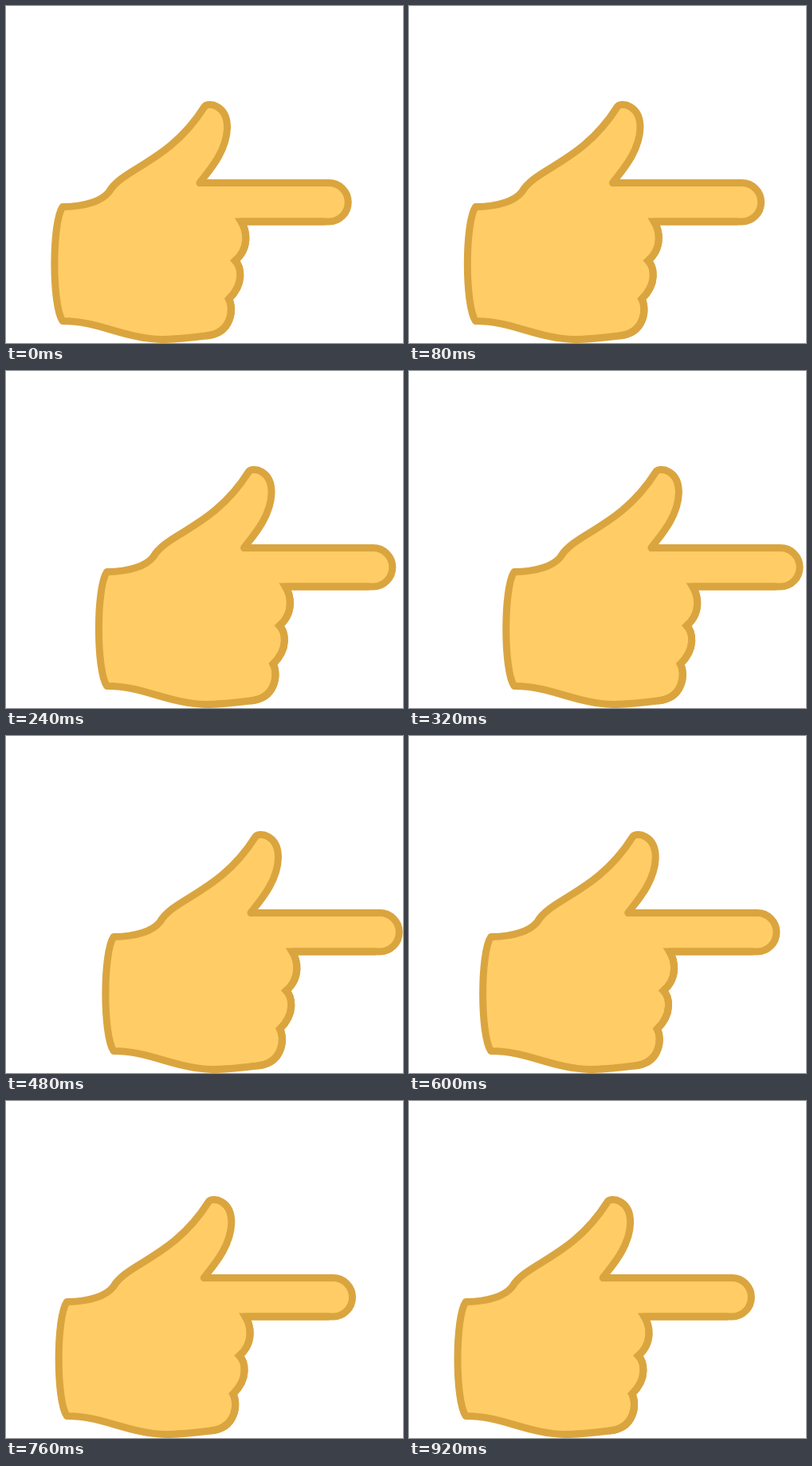
Recreate the animation shown at these times as an HTML page. Size 498 by 422 pixels, loop 960 ms.

```html
<!DOCTYPE html>
<html lang="en">
<head>
<meta charset="utf-8">
<title>Pointing hand</title>
<style>
  html, body { margin: 0; width: 100%; height: 100%; overflow: hidden; background: #fff; }
  svg { display: block; width: 498px; height: 422px; }
  path { stroke: #daa53f; stroke-width: 9; }
</style>
</head>
<body>
<svg viewBox="0 0 498 422">
  <g id="hand">
    <path fill="#ffcc66" stroke-linejoin="round" d="M71 251.5
      C100 251 120 244 129 233
      C147 202 204 197 249 126
      C254 120 278 124 277.5 153
      C276.5 184 252 209 243 221.5
      H405 A24.25 24.25 0 0 1 405 270 H295
      C302 281 306 303 287.5 319
      C294.5 326 300 347 279.5 367
      C286 378 284 410 251 413
      C230 415.5 215 417.5 195 417.5
      C150 417 115 394 71 394.5
      C57.5 375 57.5 271 71 251.5Z"/>
    <!-- sharp creases between the curled fingers -->
    <path fill="none" stroke-linejoin="miter" d="M400 270 H295
      C302 281 306 303 287.5 319
      C294.5 326 300 347 279.5 367
      C286 378 284 410 251 413"/>
  </g>
</svg>
<script>
  const LOOP = 960, HALF = LOOP / 2, STEP = 40, REACH = 64;
  const hand = document.getElementById('hand');

  // cubic-bezier(.33, 0, 0, 1), solved by bisection
  function ease(x) {
    let lo = 0, hi = 1;
    for (let i = 0; i < 24; i++) {
      const s = (lo + hi) / 2;
      if (0.99 * s * (1 - s) ** 2 + s ** 3 < x) lo = s; else hi = s;
    }
    return lo * lo * (3 - 2 * lo);
  }

  function offset(t) {
    const p = ease((t % HALF) / HALF);
    return REACH * (t < HALF ? p : 1 - p);
  }

  function draw() {
    const t = Math.floor((performance.now() % LOOP) / STEP) * STEP;
    hand.setAttribute('transform', `translate(${offset(t).toFixed(2)} 0)`);
    requestAnimationFrame(draw);
  }
  draw();
</script>
</body>
</html>
```
